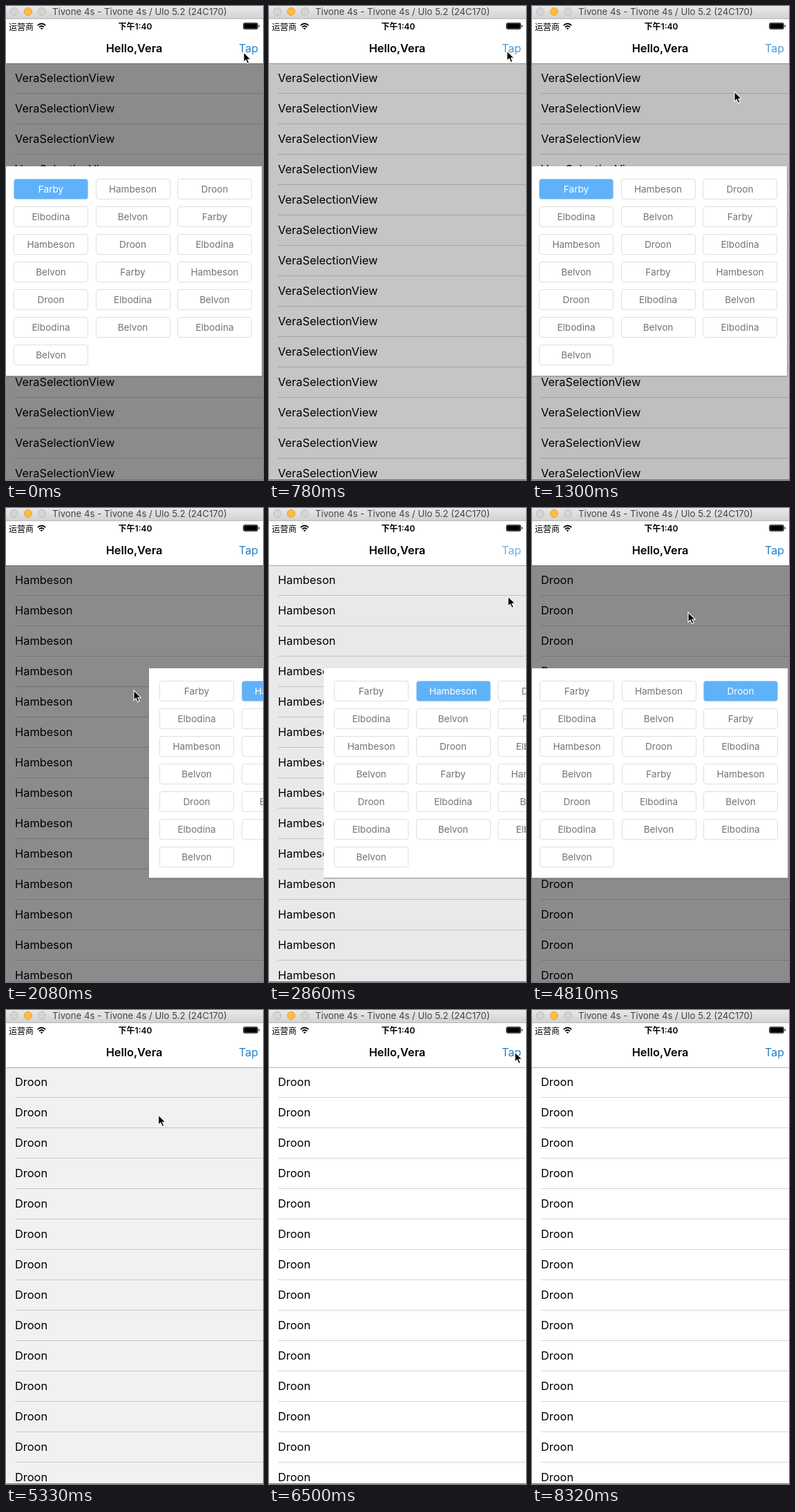
An HTML page for the animation above (8450 ms loop, 372x686 px).

```html
<!DOCTYPE html>
<html lang="en">
<head>
<meta charset="utf-8">
<title>Selection panel</title>
<style>
html, body { margin: 0; width: 100%; height: 100%; overflow: hidden; background: #fff; }
#stage { position: relative; width: 372px; height: 686px; overflow: hidden; background: #fff;
  font-family: Inter, Roboto, sans-serif; color: #000; }
#stage div, #stage svg { position: absolute; box-sizing: border-box; white-space: nowrap; }
#titlebar { left: 0; top: 0; width: 372px; height: 19px; border-bottom: 1px solid #b9b9b9;
  background: linear-gradient(#e9e9e9, #d2d2d2); }
.light { top: 2px; width: 12px; height: 12px; border-radius: 50%; background: #d5d5d5; border: 1px solid #bcbcbc; }
.light.on { background: #fdbd40; border-color: #e2a134; }
#device { left: 67px; top: 0; line-height: 17px; font-size: 13.2px; color: #444; }
#nav { left: 0; top: 19px; width: 372px; height: 64px; background: #fff; }
#carrier { left: 4px; top: 2px; font: 12px/17px "Noto Sans CJK SC", "Noto Sans CJK", sans-serif; }
#clock { left: 87px; width: 200px; top: 2px; text-align: center;
  font: 600 12px/17px Inter, "Noto Sans CJK SC", "Noto Sans CJK", sans-serif; }
#heading { left: 85.5px; width: 200px; top: 31px; line-height: 22px; text-align: center; font-size: 16.3px; font-weight: 600; }
#tap { left: 337px; top: 31px; line-height: 22px; font-size: 16px; color: #2480c8; }
#list { left: 0; top: 83px; width: 372px; height: 603px; border-top: 1px solid #b6b6b6; }
.row { left: 13px; width: 359px; height: 44px; border-bottom: 1px solid #d4d4d6; line-height: 43px; font-size: 16.4px; }
#dim { left: 0; top: 83px; width: 372px; height: 603px; background: #000; }
#panel { left: -2px; top: 232px; width: 375px; height: 304px; background: #fff;
  border: solid #a2a4a4; border-width: 0 1px 1px 0; box-shadow: 0 1px 1px rgba(0, 0, 0, .12); }
.option { width: 108px; height: 30px; border: 1px solid #dedede; border-radius: 4px; line-height: 28px;
  text-align: center; font-size: 13.6px; color: #737373; }
.option.on { background: #60b2f8; border-color: #a9d0f3; color: #fff; }
#edge { left: 0; top: 685px; width: 372px; height: 1px; background: #777; }
#cursor { left: 0; top: 0; overflow: visible; }
</style>
</head>
<body>
<div id="stage">
  <div id="list"></div>
  <div id="dim"></div>
  <div id="panel"></div>
  <div id="nav">
    <div id="carrier">运营商</div>
    <svg style="left:45px;top:5px" width="13" height="11" fill="none" stroke="#000" stroke-width="1.8">
      <path d="M.8 4.2Q6.5 -1.2 12.2 4.2M3 6.6Q6.5 3.4 10 6.6"/>
      <path d="M6.5 10.2L4.6 8.2Q6.5 6.6 8.4 8.2Z" fill="#000" stroke="none"/>
    </svg>
    <div id="clock">下午1:40</div>
    <svg style="left:343px;top:5px" width="25" height="10">
      <rect x=".5" y=".5" width="21" height="9" rx="2" fill="#888" stroke="#000" stroke-width=".7"/>
      <rect x="1.5" y="1.5" width="19" height="7" rx="1"/>
      <path d="M22.8 3.2q2.8 1.8 0 3.6z"/>
    </svg>
    <div id="heading">Hello,Vera</div>
    <div id="tap">Tap</div>
  </div>
  <div id="titlebar">
    <div class="light" style="left:6px"></div>
    <div class="light on" style="left:26px"></div>
    <div class="light" style="left:46px"></div>
    <div id="device">Tivone 4s - Tivone 4s / Ulo 5.2 (24C170)</div>
  </div>
  <div id="edge"></div>
  <svg id="cursor" width="13" height="19">
    <path d="M0 0V14.2L3.2 11.2L5.6 16.6L8.1 15.5L5.8 10.2H10.2Z" stroke="#fff" stroke-width="1.1"/>
  </svg>
</div>
<script>
const LOOP = 8450, STEP = 130, FADE = 490, PANEL_WIDTH = 375;
const $ = id => document.getElementById(id);

const [A, B, C, D, E] = ['Farby', 'Hambeson', 'Droon', 'Elbodina', 'Belvon'];
const labels = [A, B, C, D, E, A, B, C, D, E, A, B, C, D, E, D, E, D, E];

// Panel toggles, in time order
const toggles = [
  { at: -400, open: true },
  { at: 520, open: false },
  { at: 1055, open: true },
  { at: 1990, open: false },
  { at: 2730, open: true },
  { at: 3690, open: false },
  { at: 4410, open: true },
  { at: 4940, open: false }
];
const tapPresses = [-400, 520, 1055, 2730, 4410];
const picks = [
  { at: 0, index: 0, text: 'VeraSelectionView' },
  { at: 1990, index: 1, text: B },
  { at: 3690, index: 2, text: C }
];
// Pointer path: time, x, y
const pointer = [
  [0, 344, 67], [520, 345, 66], [1040, 344, 64], [1300, 293, 124], [1820, 185, 262],
  [2080, 185, 264], [2600, 350, 64], [2730, 350, 64], [2860, 346, 128], [3380, 300, 262],
  [3640, 299, 266], [3770, 299, 266], [4260, 346, 64], [4400, 344, 66], [4810, 226, 151],
  [4940, 220, 152], [6110, 222, 152], [6500, 356, 61], [7020, 354, 63], [7540, 372, -10]
];

function add(parent, className, left, top, text = '') {
  const el = document.createElement('div');
  el.className = className;
  el.style.left = left + 'px';
  el.style.top = top + 'px';
  el.textContent = text;
  return parent.appendChild(el);
}

const rows = Array.from({ length: 14 }, (_, i) => add($('list'), 'row', 13, 44 * i - 1));
const options = labels.map((label, i) =>
  add($('panel'), 'option', 15 + 118.5 * (i % 3), 18 + 40 * Math.floor(i / 3), label));

const clamp = v => Math.min(1, Math.max(0, v));
const smooth = v => v * v * (3 - 2 * v);
const latest = (items, t) => items.filter(item => item.at <= t).pop();

// Remaining distance of a damped spring: 1 at the start, 0 when settled
function spring(ms, omega = 18.4, zeta = 0.8) {
  const s = ms / 1000, root = Math.sqrt(1 - zeta * zeta), angle = omega * root * s;
  return Math.exp(-zeta * omega * s) * (Math.cos(angle) + zeta / root * Math.sin(angle));
}

function pointerAt(t) {
  const i = pointer.findIndex(p => p[0] > t);
  if (i < 0) return null;
  const [t0, x0, y0] = pointer[i - 1], [t1, x1, y1] = pointer[i];
  const k = (t - t0) / (t1 - t0);
  return [x0 + (x1 - x0) * k, y0 + (y1 - y0) * k];
}

function render(t) {
  const { at, open } = latest(toggles, t);
  const left = spring(t - at);
  const fade = smooth(clamp((t - at) / FADE));
  const shift = Math.round(PANEL_WIDTH * (open ? left : 1 - left));
  $('panel').style.transform = `translateX(${shift}px)`;
  $('panel').style.visibility = !open && t - at > FADE ? 'hidden' : 'visible';
  $('dim').style.opacity = 0.5 * (open ? fade : 1 - fade);

  const press = tapPresses.filter(p => p <= t).pop();
  $('tap').style.opacity = 0.45 + 0.55 * clamp((t - press) / 400);

  const pick = latest(picks, t);
  rows.forEach(row => row.textContent = pick.text);
  options.forEach((option, i) => option.classList.toggle('on', i === pick.index));

  const tip = pointerAt(t);
  $('cursor').style.visibility = tip ? 'visible' : 'hidden';
  if (tip) $('cursor').style.transform = `translate(${tip[0]}px, ${tip[1]}px)`;
}

const start = performance.now();
function tick() {
  const t = (performance.now() - start) % LOOP;
  render(Math.floor(t / STEP) * STEP);
  requestAnimationFrame(tick);
}
tick();
</script>
</body>
</html>
```
